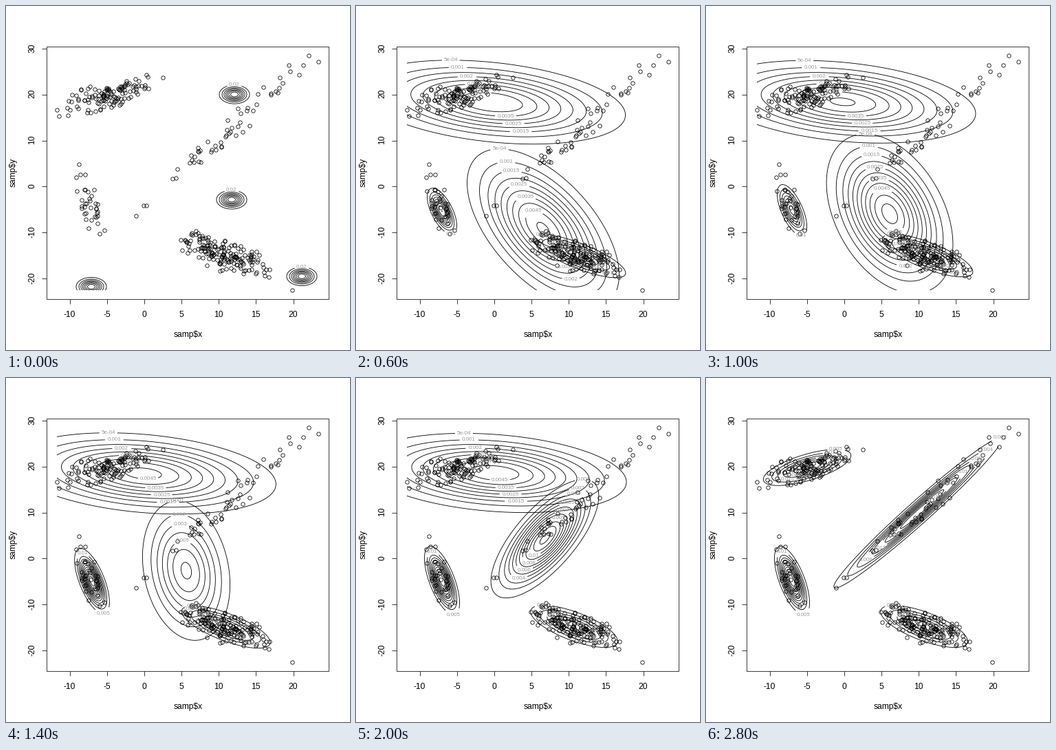
These frames come from a looping animation (500 by 500 pixels, 3000 ms). A matplotlib script:

```python
import numpy as np
import matplotlib.pyplot as plt
from matplotlib.animation import FuncAnimation
from matplotlib.patches import Rectangle

PX = 0.72                       # one pixel in points at 100 dpi
UNIT_X, UNIT_Y = 10.83, 6.68    # pixels per data unit
X0, Y0 = 201, 262.3             # pixel position of the data origin
LEFT, RIGHT, TOP, BOTTOM = 74, 454, 72, 412.5
FONT = "Liberation Sans"

# Key poses of each Gaussian, held after the last one:
# iteration, centre x, y, deviation x, y, correlation
UPPER = [(0, 332, 128.5, UNIT_X, UNIT_Y, 0),
         (1, 197, 140, 93, 29.4, -.32),
         (9, 201, 138, 90, 27, -.23),
         (11, 161, 127.5, 72, 16.5, .48),
         (12, 147, 130, 32, 13.2, .66)]
MIDDLE = [(0, 328, 281.5, UNIT_X, UNIT_Y, 0),
          (2, 272, 324, 51.3, 54, -.575),
          (6, 262, 280, 32, 51, -.2),
          (8, 261, 253, 31, 42, .48),
          (10, 288, 214, 39, 35, .955),
          (12, 308, 196, 57, 51, .98)]
LOWER_LEFT = [(0, 124, 408, UNIT_X, UNIT_Y, 0),
              (1, 125, 299, 10, 14.7, -.62),
              (7, 125, 294.5, 11.5, 22.4, -.65)]
LOWER_RIGHT = [(0, 430, 393, UNIT_X, UNIT_Y, 0),
               (1, 326, 364, 34.5, 16, -.8),
               (8, 317, 361, 33.5, 16.2, -.7)]
PATHS = [np.array(p) for p in (UPPER, MIDDLE, LOWER_LEFT, LOWER_RIGHT)]
COUNTS = [120, 52, 34, 170]     # sample points per cluster
OUTLIERS = [(74, 151), (77, 160), (228, 104), (106, 230), (115, 245),
            (189, 305), (416, 413), (411, 86), (413, 95), (426, 100),
            (440, 72), (454, 81)]

rng = np.random.default_rng(12)


def pose(path, step):
    return [np.interp(step, path[:, 0], column) for column in path[:, 1:].T]


def place(u, v, cx, cy, sx, sy, r):
    """Map standard coordinates to pixels of a correlated Gaussian."""
    return cx + sx * (r * u + np.sqrt(1 - r * r) * v), cy - sy * u


def sample(path, n):
    """Seeded points spread like the final pose of a path."""
    u, v = rng.standard_normal((2, 2 * n))
    near = np.flatnonzero(np.hypot(u, v) < 2.3)[:n]
    return np.column_stack(place(u[near], v[near], *path[-1, 1:]))


points = np.vstack([sample(p, n) for p, n in zip(PATHS, COUNTS)] + [OUTLIERS])

fig = plt.figure(figsize=(5, 5), dpi=100, facecolor="white")
ax = fig.add_axes([0, 0, 1, 1])
ax.set_xlim(0, 500)
ax.set_ylim(500, 0)
ax.axis("off")


def line(x, y, width=1):
    return ax.plot(x, y, color="black", lw=width * PX,
                   solid_capstyle="butt")[0]


def text(x, y, s, size=12, **kw):
    return ax.text(x, y, s, fontsize=size * PX, family=FONT, ha="center",
                   va="center", parse_math=False, **kw)


def draw_plot():
    ax.add_patch(Rectangle((59, 59), 410, 367, fill=False, lw=.75 * PX))
    for v in range(-10, 21, 5):
        x = X0 + v * UNIT_X
        line([x, x], [426, 433], .75)
        text(x - .5, 448.5, str(v))
    for v in range(-20, 31, 10):
        y = Y0 - v * UNIT_Y
        line([52, 59], [y, y], .75)
        text(38.5, y - 1, str(v), rotation=90)
    text(264.5, 477.5, "samp$x")
    text(10.5, 242, "samp$y", rotation=90)
    ax.plot(*points.T, "o", mfc="none", mec="black", ms=5.4 * PX,
            mew=.8 * PX)


draw_plot()
clip = Rectangle((LEFT, TOP), RIGHT - LEFT, BOTTOM - TOP,
                 transform=ax.transData)
turn = np.linspace(-np.pi, np.pi, 361)
moving = []


def pretty_step(peak):
    """Round spacing for about ten contour levels."""
    cell = peak / 10
    base = 10 ** np.floor(np.log10(cell))
    return base * [1, 2, 5, 10][np.searchsorted([1.4, 2.8, 7], cell / base)]


def level_name(value):
    name = f"{value:.4g}"
    return "5e-04" if name == "0.0005" else name


def draw_contour(k, name, below, cx, cy, sx, sy, r):
    """Draw one ellipse, open around a label at its top or bottom."""
    shape = cx, cy, k * sx, k * sy, r
    start = np.pi if below else 0
    x, y = place(np.cos(start + turn), np.sin(start + turn), *shape)
    lx, ly = place(np.cos(start), np.sin(start), *shape)
    if k * sx > 20 and LEFT + 8 < lx < RIGHT - 8 and TOP < ly < BOTTOM - 3:
        reach = 2.1 * len(name) + 2
        gap = (np.hypot(x - lx, y - ly) < reach) & (np.abs(turn) < 1.2)
        x = np.where(gap, np.nan, x)
        moving.append(text(lx, ly, name, 8, color="#999999"))
    curve = line(x, y, .85)
    curve.set_clip_path(clip)
    moving.append(curve)


def draw_gaussian(part, step):
    cx, cy, sx, sy, r = pose(PATHS[part], step)
    area = sx / UNIT_X * sy / UNIT_Y * np.sqrt(1 - r * r)
    peak = 1 / (2 * np.pi * area)
    spacing = pretty_step(peak)
    for j in range(1, int(peak / spacing) + 1):
        level = j * spacing
        # labels alternate between bottom and top of successive contours
        below = (j + part) % 2 == 1 and (j > 2 or part > 1)
        draw_contour(np.sqrt(2 * np.log(peak / level)), level_name(level),
                     below, cx, cy, sx, sy, r)


def update(frame):
    while moving:
        moving.pop().remove()
    step = max(frame - 1, 0)    # the starting guess is held twice as long
    for part in range(len(PATHS)):
        draw_gaussian(part, step)
    return moving


animation = FuncAnimation(fig, update, frames=15, interval=200, repeat=True,
                          repeat_delay=0, blit=False)
plt.show()
```
